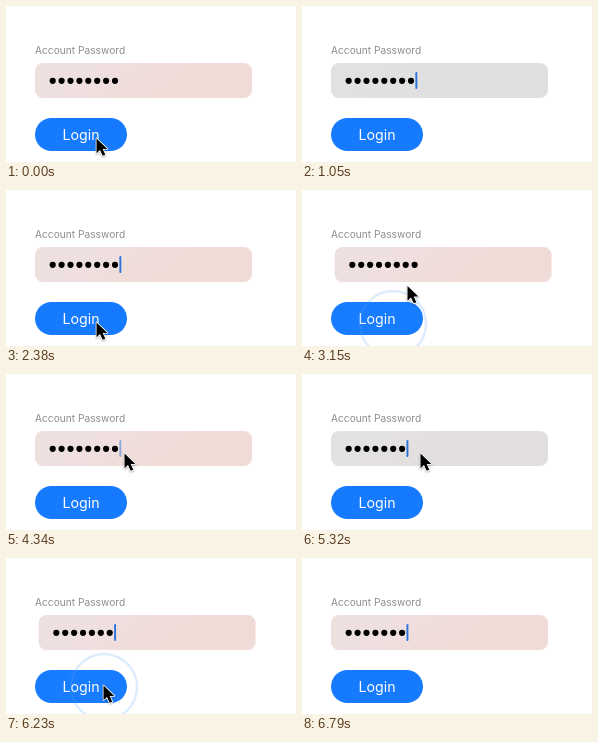
Animation of 290 by 156 pixels, one loop 7070 ms. Source, as an HTML page with a canvas:

```html
<!DOCTYPE html>
<html lang="en">
<head>
<meta charset="utf-8">
<title>Password shake</title>
<style>
  html, body { margin: 0; width: 100%; height: 100%; overflow: hidden; background: #fff; }
  canvas { display: block; width: 290px; height: 156px; }
</style>
</head>
<body>
<canvas id="stage"></canvas>
<script>
const W = 290, H = 156, LOOP = 7070, STEP = 70;
const FONT = 'Inter, Roboto, "Liberation Sans", sans-serif';
const canvas = document.getElementById('stage');
const ctx = canvas.getContext('2d');
const dpr = window.devicePixelRatio || 1;
canvas.width = W * dpr;
canvas.height = H * dpr;

const clicks = [
  { at: 1400, x: 91, y: 134 },
  { at: 2730, x: 91, y: 134 },
  { at: 5810, x: 98, y: 129 },
];
const SHAKE_DELAY = 170, SHAKE_TIME = 520, RIPPLE_TIME = 450;

// [time, value...]
const caretKeys = [[0, 0], [69, 0], [70, 1], [1680, 1], [1960, 0], [2120, 0], [2380, 1], [2730, 1],
  [3010, 0], [3500, 0], [3780, 1], [4200, 1], [4480, 0], [5039, 0], [5040, 1]];
const pointerKeys = [[2800, 90, 132], [3150, 105, 95.5], [3430, 112, 83], [3920, 112, 83],
  [4060, 110, 81], [4200, 110, 81], [4340, 118, 79], [5320, 118, 79], [5740, 97, 127]];
const hidden = [[70, 1190], [5040, 5320], [6720, LOOP]];

const clamp = v => Math.min(1, Math.max(0, v));
const mix = (a, b, k) => a + (b - a) * k;
const smooth = u => u * u * (3 - 2 * u);
const within = (t, [from, to]) => t >= from && t < to;
const rgb = (a, b, k) => `rgb(${a.map((v, i) => Math.round(mix(v, b[i], k)))})`;

function sample(keys, t, ease = u => u) {
  const next = keys.findIndex(k => k[0] > t);
  if (next === 0) return keys[0].slice(1);
  if (next < 0) return keys[keys.length - 1].slice(1);
  const a = keys[next - 1], b = keys[next];
  const k = ease((t - a[0]) / (b[0] - a[0]));
  return a.slice(1).map((v, i) => mix(v, b[i + 1], k));
}

function shakeOffset(t) {
  return clicks.reduce((sum, c) => {
    const u = clamp((t - c.at - SHAKE_DELAY) / SHAKE_TIME);
    return sum + 7 * Math.sin(6 * Math.PI * smooth(u));
  }, 0);
}

// 1 = error tint, 0 = neutral
function errorTint(t) {
  if (t < 1400 + SHAKE_DELAY) return 1 - clamp((t - 70) / 350);
  if (t < 5810 + SHAKE_DELAY) return 1 - clamp((t - 5040) / 350);
  return 1;
}

function dotCount(t) {
  return within(t, [70, 840]) || t >= 5040 ? 7 : 8;
}

function pressed(t) {
  return Math.max(...clicks.map(c => {
    const d = t - c.at;
    return clamp((d - 70) / 140) * (1 - clamp((d - 240) / 200));
  }));
}

function pill(x, y, w, h, r, fill) {
  ctx.beginPath();
  ctx.roundRect(x, y, w, h, r);
  ctx.fillStyle = fill;
  ctx.fill();
}

function text(str, x, y, size, color, align) {
  ctx.font = `400 ${size}px ${FONT}`;
  ctx.textAlign = align;
  ctx.fillStyle = color;
  ctx.fillText(str, x, y);
}

function drawField(t) {
  const tint = errorTint(t), count = dotCount(t);
  ctx.save();
  ctx.translate(shakeOffset(t), 0);
  const fill = ctx.createLinearGradient(100, 50, 140, 100);
  fill.addColorStop(0, rgb([225, 225, 225], [239, 224, 224], tint));
  fill.addColorStop(1, rgb([223, 223, 223], [240, 219, 215], tint));
  pill(29, 57, 217, 35, 8, fill);
  ctx.fillStyle = '#000';
  for (let i = 0; i < count; i++) {
    ctx.beginPath();
    ctx.arc(46.7 + i * 8.9, 74.8, 3.1, 0, 7);
    ctx.fill();
  }
  ctx.globalAlpha = sample(caretKeys, t)[0];
  pill(42.2 + count * 8.9, 66, 1.9, 17, 0.9, '#2874dc');
  ctx.restore();
}

function drawButton(t) {
  const k = pressed(t);
  pill(29, 112, 92, 33, 16.5, rgb([22, 122, 255], [36, 141, 255], k));
  text('Login', 75, 134, 14.2, rgb([255, 255, 255], [205, 230, 255], k), 'center');
}

function drawRipple(t) {
  for (const c of clicks) {
    const u = (t - c.at) / RIPPLE_TIME;
    if (u < 0 || u >= 1) continue;
    ctx.beginPath();
    ctx.arc(c.x, c.y, 33 * (1 - (1 - u) ** 3), 0, 7);
    ctx.fillStyle = `rgba(190,220,255,${0.5 * clamp(1 - u * 2)})`;
    ctx.fill();
    ctx.lineWidth = 2.4;
    ctx.strokeStyle = `rgba(95,160,245,${clamp(1.15 - u)})`;
    ctx.stroke();
  }
}

function drawPointer(t) {
  if (hidden.some(span => within(t, span))) return;
  const [x, y] = sample(pointerKeys, t, smooth);
  ctx.save();
  ctx.translate(x, y);
  const arrow = new Path2D('M.5 .5V15.2L4 11.9L6.7 17.8L9.3 16.7L6.7 10.9H11.4Z');
  ctx.shadowColor = 'rgba(0,0,0,.3)';
  ctx.shadowBlur = 2 * dpr;
  ctx.shadowOffsetY = dpr;
  ctx.lineJoin = 'round';
  ctx.lineWidth = 1.6;
  ctx.strokeStyle = '#fff';
  ctx.stroke(arrow);
  ctx.shadowColor = 'transparent';
  ctx.fillStyle = '#000';
  ctx.fill(arrow);
  ctx.restore();
}

function draw(t) {
  ctx.setTransform(dpr, 0, 0, dpr, 0, 0);
  ctx.fillStyle = '#fff';
  ctx.fillRect(0, 0, W, H);
  text('Account Password', 29, 47.8, 10.2, '#8e8e8e', 'left');
  drawField(t);
  drawButton(t);
  drawRipple(t);
  drawPointer(t);
}

const start = performance.now();
function tick() {
  const t = (performance.now() - start) % LOOP;
  draw(Math.floor(t / STEP) * STEP);
  requestAnimationFrame(tick);
}
tick();
</script>
</body>
</html>
```
